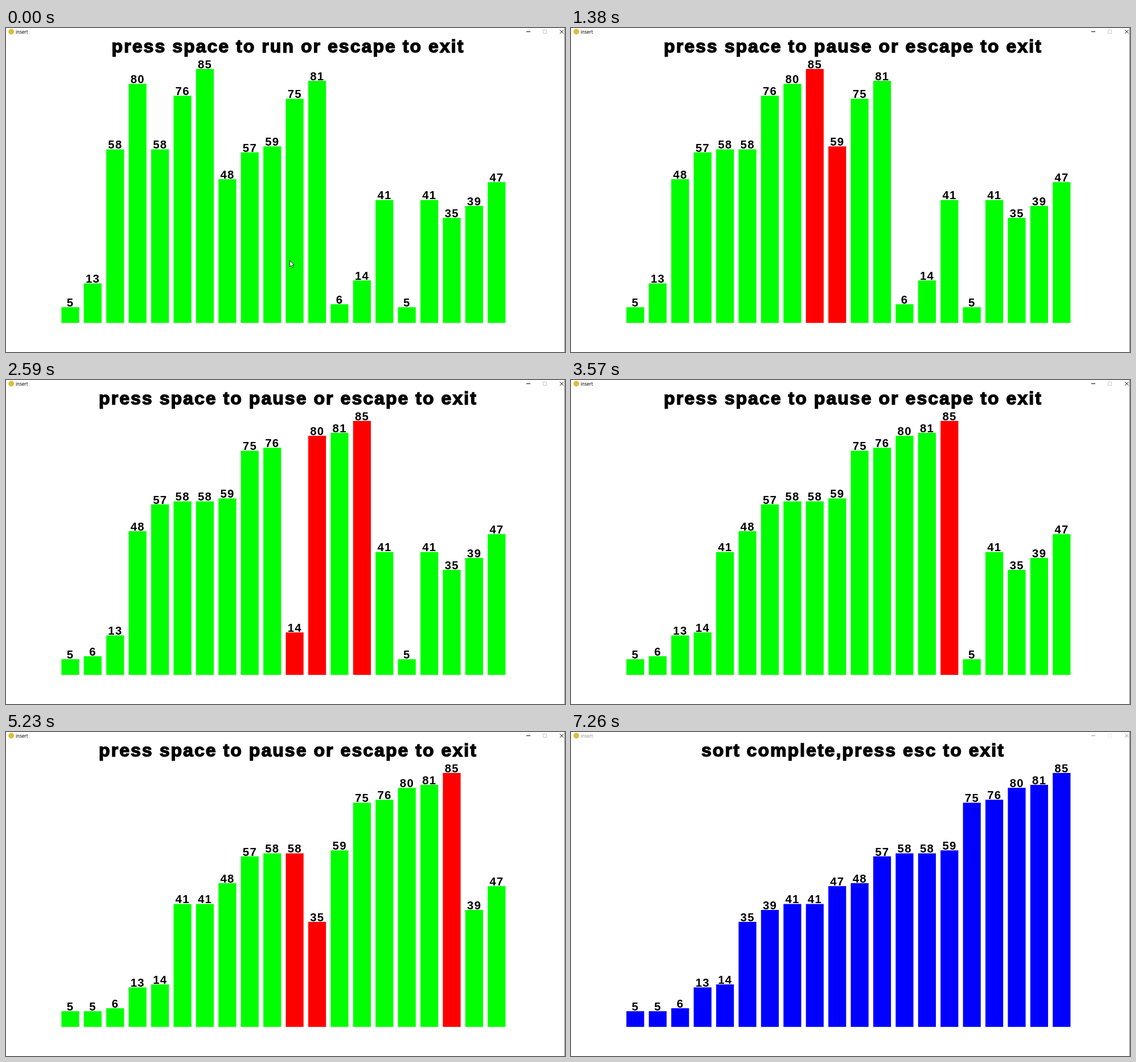
Recreate the animation shown at these times as an HTML page. Size 982 by 570 pixels, loop 7300 ms.

```html
<!DOCTYPE html>
<html lang="en">
<head>
<meta charset="utf-8">
<title>insert</title>
<style>
  html, body { margin: 0; width: 100%; height: 100%; overflow: hidden; background: #fff; }
  svg { display: block; width: 982px; height: 570px; }
  text { white-space: pre; }
  #headline {
    font: bold 32px "Liberation Sans", Arial, sans-serif;
    letter-spacing: 2.05px; text-anchor: middle;
    stroke: #000; stroke-width: 1.5px;
  }
  #bars text {
    font: bold 20.3px "Liberation Sans", Arial, sans-serif;
    letter-spacing: 1.3px; text-anchor: middle;
  }
  #caption { font: 8px "Noto Sans", "Open Sans", sans-serif; }
</style>
</head>
<body>
<svg viewBox="0 0 982 570">
  <rect width="982" height="570" fill="#fff"/>
  <circle cx="9.3" cy="6.5" r="5" fill="#dcbc3c"/>
  <g id="chrome" fill="none" stroke="#000">
    <text id="caption" x="17" y="9.7" fill="#000" stroke="none">insert</text>
    <path d="M914 6.5h7M973 3.3l6.4 6.4M979.4 3.3l-6.4 6.4"/>
    <rect x="943.5" y="3.5" width="6" height="6" stroke="#ccc"/>
  </g>
  <path d="M981.5 0V570" stroke="#808080"/>
  <text id="headline" x="495.5" y="42.6"></text>
  <g id="bars"></g>
  <path id="cursor" d="M.5 .5V11.6L3 9.2L4.8 13.1L6.6 12.3L4.9 8.5H8Z" fill="#fff" stroke="#000" stroke-width=".8"/>
</svg>
<script>
const LOOP = 7300, START = 530, FIRST_STATE = 451.4, STATE_MS = 17.545;
const GREEN = '#00ff00', RED = '#ff0000', BLUE = '#0000ff';
const values = [5, 13, 58, 80, 58, 76, 85, 48, 57, 59, 75, 81, 6, 14, 41, 5, 41, 35, 39, 47];
const $ = id => document.getElementById(id);

// Every drawn state of the insertion sort: slot values and highlighted slots.
function sortStates(list) {
  const a = [...list], states = [];
  const show = (...red) => states.push({ order: [...a], red });
  for (let i = 1; i < a.length; i++) {
    let j = i;
    while (j > 0 && a[j - 1] > a[j]) {
      show(j - 1, j, i);
      [a[j - 1], a[j]] = [a[j], a[j - 1]];
      show(j - 1, j, i);
      show(j - 1, i);
      j--;
    }
    if (j > 0) show(j - 1, j, i);
    show(i);
  }
  return states;
}

const states = sortStates(values);
const sorted = [...values].sort((p, q) => p - q);

function add(tag, attrs) {
  const el = document.createElementNS('http://www.w3.org/2000/svg', tag);
  for (const key in attrs) el.setAttribute(key, attrs[key]);
  return $('bars').appendChild(el);
}

const slots = values.map((_, i) => {
  const x = 97.3 + 39.42 * i;
  return { bar: add('rect', { x, width: 31.2 }), label: add('text', { x: x + 15.8 }) };
});

function drawBars(order, colorOf) {
  slots.forEach(({ bar, label }, i) => {
    const top = 517.4 - 5.24 * order[i];
    bar.setAttribute('y', top);
    bar.setAttribute('height', 518.8 - top);
    bar.setAttribute('fill', colorOf(i));
    label.setAttribute('y', top - 1.2);
    label.textContent = order[i];
  });
}

// Screen refresh: 40 ms ticks, with one 50 ms tick in every 770 ms.
function tick(t) {
  if (t < START) return t;
  const r = (t - START) % 770;
  if (r < 560) return t - r % 40;
  return r < 570 ? t - r + 520 : t - (r - 10) % 40;
}

function render(time) {
  const t = tick(time);
  const n = Math.floor((t - FIRST_STATE) / STATE_MS);
  const done = n >= states.length;

  if (done) drawBars(sorted, () => BLUE);
  else if (t < START) drawBars(values, () => GREEN);
  else drawBars(states[n].order, i => states[n].red.includes(i) ? RED : GREEN);

  $('headline').textContent = done ? 'sort complete,press esc to exit'
    : `press space to ${t < 320 ? 'run' : 'pause'} or escape to exit`;

  const p = Math.max(0, (t - 860) / 400);
  $('cursor').setAttribute('transform', `translate(${498 + 334 * p} ${408.5 + 137 * p})`);
  $('cursor').setAttribute('visibility', t < 1340 ? 'visible' : 'hidden');
  $('chrome').setAttribute('opacity', time < 7220 ? 1 : time < 7260 ? 0.7 : 0.42);
}

function loop() {
  render(performance.now() % LOOP);
  requestAnimationFrame(loop);
}
loop();
</script>
</body>
</html>
```
